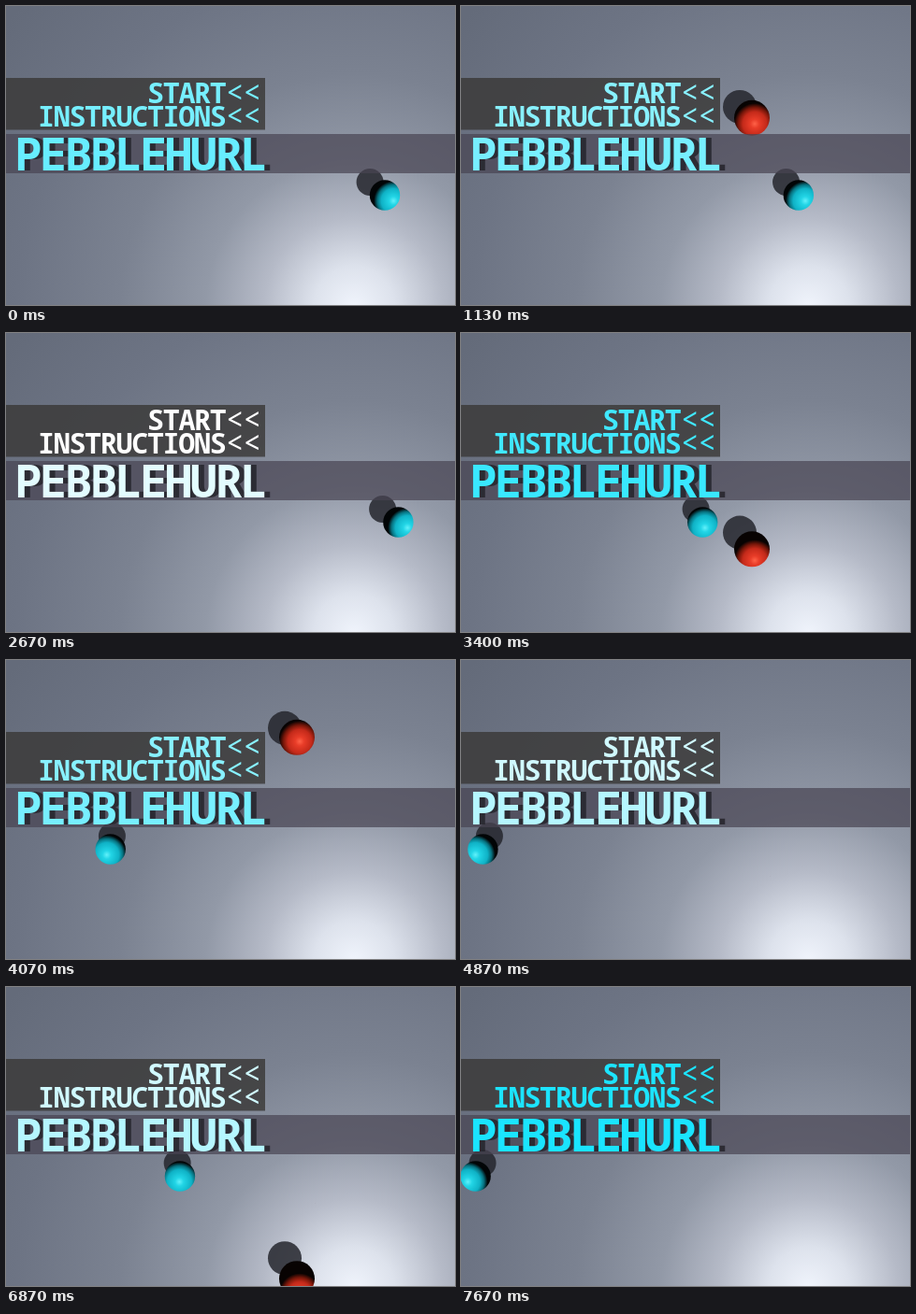
These frames come from a looping animation (480x320 px, 7740 ms). An HTML page:

```html
<!DOCTYPE html>
<html lang="en">
<head>
<meta charset="utf-8">
<title>Pebblehurl menu</title>
<style>
  html, body { margin: 0; width: 100%; height: 100%; overflow: hidden; background: #6b7180; }
  svg { display: block; width: 480px; height: 320px; }
  text { font-family: "Noto Sans Mono", "DejaVu Sans Mono", monospace; font-weight: 800; }
  .title { font-size: 49px; letter-spacing: -2.6px; }
  .item { font-size: 30px; letter-spacing: -1.3px; }
  .arrows { font-size: 32px; font-weight: 500; letter-spacing: -.8px; }
</style>
</head>
<body>
<svg viewBox="0 0 480 320" xmlns="http://www.w3.org/2000/svg">
  <defs>
    <radialGradient id="floor" gradientUnits="userSpaceOnUse" cx="372" cy="322" r="480">
      <stop offset="0" stop-color="#f0f4fc"/>
      <stop offset=".09" stop-color="#dde2ec"/>
      <stop offset=".2" stop-color="#b5bac7"/>
      <stop offset=".33" stop-color="#9299a7"/>
      <stop offset=".52" stop-color="#7b8291"/>
      <stop offset=".75" stop-color="#6d7484"/>
      <stop offset="1" stop-color="#646b7a"/>
    </radialGradient>
    <radialGradient id="blueSkin" gradientUnits="userSpaceOnUse" r="21">
      <stop offset="0" stop-color="#62f0fa"/>
      <stop offset=".22" stop-color="#22d5e6"/>
      <stop offset=".62" stop-color="#0fb2c6"/>
      <stop offset=".82" stop-color="#07707e"/>
      <stop offset="1" stop-color="#020506"/>
    </radialGradient>
    <radialGradient id="redSkin" gradientUnits="userSpaceOnUse" r="22">
      <stop offset="0" stop-color="#ff6248"/>
      <stop offset=".22" stop-color="#e83c28"/>
      <stop offset=".58" stop-color="#c42a1a"/>
      <stop offset=".8" stop-color="#741609"/>
      <stop offset="1" stop-color="#080302"/>
    </radialGradient>
  </defs>

  <rect width="480" height="320" fill="url(#floor)"/>
  <g fill="#25262d" fill-opacity=".85">
    <circle id="blueShadow" r="14.5"/>
    <circle id="redShadow" r="18"/>
  </g>
  <circle id="blue" r="16.2" fill="url(#blueSkin)"/>
  <circle id="red" r="19" fill="url(#redSkin)"/>

  <rect y="77" width="277" height="55.5" fill="#3a3937" fill-opacity=".82"/>
  <rect y="137" width="480" height="42" fill="#484452" fill-opacity=".7"/>

  <text class="title" x="15" y="175.500" fill="#24242b" fill-opacity=".85">PEBBLEHURL</text>
  <text class="title" id="title" x="9" y="175.500">PEBBLEHURL</text>
  <g id="menu">
    <text class="item" x="151" y="104">START</text>
    <text class="arrows" x="235" y="104">&lt;&lt;</text>
    <text class="item" x="34" y="129">INSTRUCTIONS</text>
    <text class="arrows" x="235" y="129">&lt;&lt;</text>
  </g>
</svg>
<script>
const LOOP = 7740, STEP = 200 / 3;
const BLUE_Y = 202.5, RED_X = 311;

// Straight runs between the bounces: [time, position]
const blueRun = [[0, 405], [470, 507], [1364, 310], [2268, 507], [4666, -20], [6237, 320], [LOOP, 0]];
const redRun = [[0, -97], [79, -115], [2517, 428], [4955, -115], [7385, 428], [LOOP, 349]];

const $ = id => document.getElementById(id);

function along(run, t) {
  const i = Math.max(1, run.findIndex(([time]) => time >= t));
  const [t0, p0] = run[i - 1], [t1, p1] = run[i];
  return p0 + (p1 - p0) * (t - t0) / (t1 - t0);
}

function place(node, x, y) {
  node.setAttribute("cx", x.toFixed(2));
  node.setAttribute("cy", y.toFixed(2));
}

function tint(w) {
  return `rgb(${Math.round(10 + 245 * w)},${Math.round(226 + 29 * w)},255)`;
}

function draw(t) {
  const x = along(blueRun, t), y = along(redRun, t);

  place($("blue"), x, BLUE_Y);
  place($("blueSkin"), x + (x - 200) * 0.045, BLUE_Y + 6);
  place($("blueShadow"), x - 3.5 - (x - 198) * 0.06, BLUE_Y - 14);

  place($("red"), RED_X, y);
  place($("redSkin"), RED_X + 3, y + y * 0.052);
  place($("redShadow"), 298, 36 + (y - 44) * 0.948);

  // Text swings between cyan and white every two seconds
  const phase = ((t + 400) % 2000) / 1000;
  const white = 1 - Math.abs(1 - phase);
  $("title").setAttribute("fill", tint(white * 0.95));
  $("menu").setAttribute("fill", tint(Math.min(1, white * 1.1)));
}

const start = performance.now();
function tick() {
  const t = (performance.now() - start) % LOOP;
  draw(Math.min(LOOP, Math.floor((t + 3.4) / STEP) * STEP));
  requestAnimationFrame(tick);
}
draw(0);
requestAnimationFrame(tick);
</script>
</body>
</html>
```
